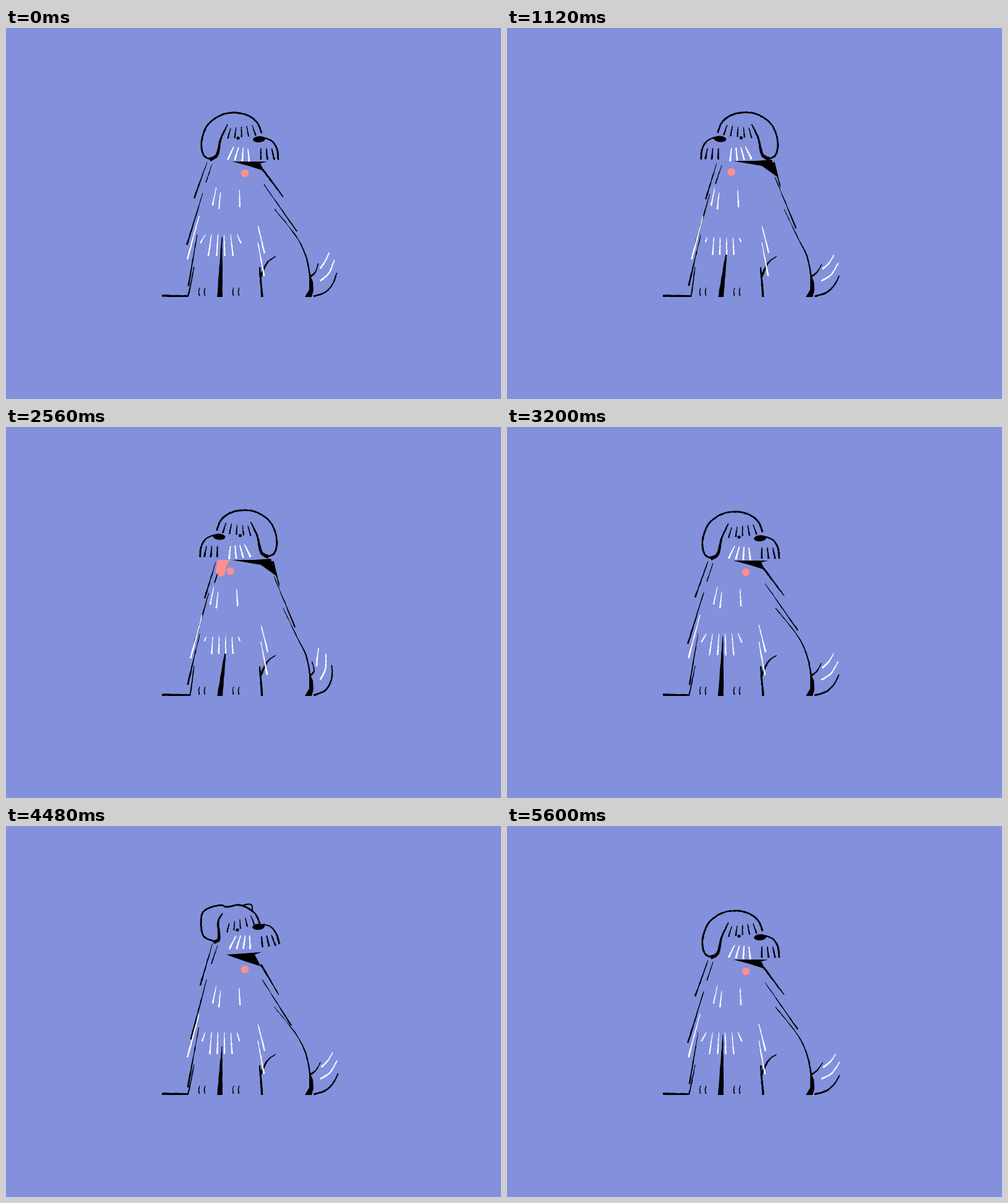
An HTML page with a canvas for the animation above (5680 ms loop, 800 by 600 pixels).

```html
<!DOCTYPE html>
<html>
<head>
<meta charset="utf-8">
<style>
  html, body { margin: 0; height: 100%; overflow: hidden; background: #8390dc; }
  canvas { display: block; }
</style>
</head>
<body>
<canvas width="800" height="600"></canvas>
<script>
const ctx = document.querySelector('canvas').getContext('2d');
const BG = '#8390dc', INK = '#000', WHITE = '#fff', PINK = '#ff8f8b';
const LOOP = 5680, STEP = 80, GROUND = 435;

// A row of straight hairs as x1,y1,x2,y2: evenly spaced, tips fanning out.
const row = (n, x, step, y, rise, len, lean, fan) =>
  Array.from({ length: n }, (_, i) =>
    [x + step * i, y + rise * i, x + step * i + lean + fan * i, y + rise * i + len]).flat();

// Head key points; looking left is the right-facing head flipped.
const heads = {
  right: {
    skull: [329,212, 319,205, 316,184, 325,158, 345,142, 367,137, 390,141, 406,153, 413,170],
    earL: [329,213, 341,205, 347,180, 358,156],
    muzzle: [416,177, 430,183, 438,196, 440,213],
    eye: [375,178], nose: [409,180],
    bangs: row(5, 363, 8.7, 162, -1.2, 17, -5, 2.7),
    chin: row(3, 412, 8.7, 195, 0, 18, 0, 2),
    beardL: row(4, 368, 7.7, 192, 1, 21, -10, 4)
  },
  front: {
    skull: [322,207, 309,200, 311,183, 331,158, 370,143, 410,154, 432,174, 438,196, 428,207],
    earL: [322,207, 333,200, 337,180, 342,166],
    earR: [428,207, 412,201, 408,183, 403,166],
    muzzle: [385,184, 399,190, 410,199, 423,210],
    eye: [346,182], eye2: [393,182], nose: [368.5,184.5],
    bangs: row(5, 350, 12, 164, 0, 14, -2, 3),
    chin: row(3, 362, 12, 206, 0, 25, 3, 4.5),
    beardL: row(4, 339, 4, 197, 3, 25, -3, 1.5),
    beardR: row(3, 400, -4, 199, 3, 15, 17, 0)
  },
  alert: {
    skull: [334,186, 318,176, 316,145, 327,133, 347,128, 357,131, 379,128, 402,141, 411,161],
    earL: [335,188, 344,182, 343,155, 350,141],
    flap: [381,129, 390,126.5, 397,128, 398,137],
    muzzle: [415,159, 428,163, 437,175, 442,191],
    eye: [374,168], nose: [408,163],
    bangs: row(5, 361, 8.6, 157, -3, 15, -4, 2.5),
    chin: row(3, 413, 8, 178, -1, 18, 2, 2.5),
    beardL: row(4, 372, 7.3, 177, 0, 22, -11, 4)
  }
};

// Shadow under the head, tag, shoulders, and how far the side tufts stick out.
const necks = {
  right: { mouth: [366,216, 422,216, 411,219, 417,231, 392,223], tag: [386,235],
    sides: [325,217, 415,229], flare: [13] },
  front: { mouth: [371,234, 400,232, 416,220, 428,236, 400,235], tag: [369,237],
    sides: [335,197, 424,227], flare: [9] },
  left: { mouth: [365,215, 400,215, 428,213, 437,241, 412,223], tag: [362.5,233],
    sides: [339,219, 431,217], flare: [5] },
  alert: { mouth: [356,208, 413,204, 402,208, 412,227, 384,218], tag: [386,232],
    sides: [334,190, 412,224], flare: [9] }
};

// Blends shared parts; a part known to one side only shows while that side is nearer.
function mix(a, b, k) {
  const out = {};
  for (const key in { ...a, ...b })
    out[key] = a[key] && b[key] ? a[key].map((v, i) => v + (b[key][i] - v) * k) : (k <= .5 ? a : b)[key];
  return out;
}

// Eases a value through steps of [from, to, target].
function track(t, v, ...steps) {
  for (const [from, to, target] of steps) {
    const k = Math.max(0, Math.min(1, (t - from) / (to - from)));
    v += (target - v) * k * k * (3 - 2 * k);
  }
  return v;
}

let seed = 0, phase = 0;
function rough() {
  const n = Math.sin(++seed * 12.9898 + phase * 78.233) * 43758.5453;
  return n - Math.floor(n) - .5;
}

function fill(points, color) {
  ctx.fillStyle = color;
  ctx.beginPath();
  for (let i = 0; i < points.length; i += 2) ctx.lineTo(points[i], points[i + 1]);
  ctx.fill();
}

function oval([x, y], rx, ry, color, angle = 0) {
  ctx.fillStyle = color;
  ctx.beginPath();
  ctx.ellipse(x, y, rx, ry, angle, 0, 7);
  ctx.fill();
}

// Tapered, slightly ragged stroke along a smooth curve through the points.
function brush(p, w0, w1, color = INK) {
  const n = p.length / 2 - 1, count = n > 1 ? n * 10 : 14, sideA = [], sideB = [];
  const pick = (i, c) => p[2 * Math.max(0, Math.min(n, i)) + c];
  const curve = (s, c) => {
    const i = Math.min(n - 1, Math.floor(s * n)), u = s * n - i;
    const [a, b, d, e] = [-1, 0, 1, 2].map(o => pick(i + o, c));
    return n === 1 ? b + (d - b) * u :
      b + .5 * u * (d - a + u * (2 * a - 5 * b + 4 * d - e + u * (3 * (b - d) + e - a)));
  };
  for (let i = 0; i <= count; i++) {
    const s = i / count, s0 = Math.max(0, s - .01), s1 = Math.min(1, s + .01);
    const x = curve(s, 0), y = curve(s, 1);
    const dx = curve(s1, 0) - curve(s0, 0), dy = curve(s1, 1) - curve(s0, 1), len = Math.hypot(dx, dy) || 1;
    const half = (w0 + (w1 - w0) * s) / 2, a = half + rough() * .7, b = half + rough() * .7;
    sideA.push(x - dy / len * a, y + dx / len * a);
    sideB.unshift(x + dy / len * b, y - dx / len * b);
  }
  fill([...sideA, ...sideB], color);
}

function hairs(list, w0, w1, color = INK) {
  for (let i = 0; list && i < list.length; i += 4)
    brush(list.slice(i, i + 4).map(v => v + rough() * .6), w0, w1, color);
}

// Bends the tail round its base; points further out swing more.
function drawTail(angle) {
  const bend = points => {
    const out = [];
    for (let i = 0; i < points.length; i += 2) {
      const x = points[i] - 494, y = points[i + 1] - 418, r = Math.hypot(x, y);
      const a = Math.atan2(y, x) - angle * Math.max(0, Math.min(1, (r - 16) / 25));
      out.push(494 + r * Math.cos(a), 418 + r * Math.sin(a));
    }
    return out;
  };
  brush(bend([492,402, 501,395, 509,382]), 3, 1.2);
  brush(bend([497,434, 516,428, 529,416, 537,401]), 3, 1.8);
  brush(bend([510,390, 521,380, 529,367]), 2.8, 1.6, WHITE);
  brush(bend([508,409, 524,399, 536,380]), 2.8, 1.6, WHITE);
}

function drawBody({ sides: [lx, ly, rx, ry], flare: [flare] }, side, perk) {
  for (const [from, to, out] of [[0, .35, 1], [.3, .8, 1.1], [.7, 1.2, .2]]) {
    const x = u => lx + (302 - lx) * u, y = u => ly + (384 - ly) * u;
    brush([x(from), y(from), x(to) - flare * out, y(to)], 1, 2.6);
  }
  brush([lx + 8, ly + 3, lx - 2, ly + 33], 1, 1.5);
  brush([rx, ry, 448 - 6 * side - 7 * perk, 273 - 16 * side], 3.2, 1.5);
  brush([rx + 2, ry + 24, 470 - 3 * side - 9 * perk, 329 - 5 * side - 6 * perk], 1, 2);
  brush([434 + 14 * side, 293, 469, 337, 485, 370, 491.5, 402], 1, 2.6);
  fill([490,397, 496,410, 497,424, 494,435, 483,435, 490,423], INK);

  brush([252,433, 290 + 3 * side,433.5, 295 + 3 * side,430, 304,386], 3.8, 1.2);
  brush([349 + 7 * side, 338 + 14 * side + 18 * perk, 345.5, 436], 1, 9);
  brush([410,387, 414,436], 2.5, 3.5);
  brush([436,369, 422,380, 411,403], 1, 4);
  for (const x of [313, 322, 368, 377]) brush([x, 420, x - 1.5, 426, x - .5, 433], 1.2, 1.8);

  // Chest hairs, then the fringe with short ends, then the long side hairs.
  hairs([340,258,334,287, 347,266,344,293, 377,262,378,290].map((v, i) => i % 2 ? v : v - 4 * side), 1.2, 2.4, WHITE);
  for (let i = 0; i < 6; i++) {
    const x = 322 + 10.3 * i + 2 * side, fan = 2.8 - 1.6 * side - perk;
    hairs([x, 334 + 5 * side, x + fan * (i - 2.8), 334 + (i % 5 ? 35 : 14) - 2 * side], 1.2, 2.4, WHITE);
  }
  hairs([312,304,293,374, 407,320,418,364, 407,347,417,401].map((v, i) => i % 2 ? v : v + 5 * side), 1.2, 2.6, WHITE);
}

function drawHead(head, closed) {
  brush(head.skull, 2.8, 2.8);
  if (head.earL) brush(head.earL, head.earR ? 3 : 6.5, 1.5);
  if (head.earR) brush(head.earR, 3, 1.5);
  if (head.flap) brush(head.flap, 2.2, 2);
  hairs(head.bangs, 1.2, 2.4);
  for (const eye of [head.eye, head.eye2])
    if (eye) oval(eye, closed ? 3.5 : 2.6, closed ? 1 : 2.6, INK);
  oval(head.nose, 10, 5, INK, -.08);
  brush(head.muzzle, 2.2, 3);
  hairs(head.chin, 1.6, 3);
  hairs(head.beardL, 1.6, 3, WHITE);
  hairs(head.beardR, 1.6, 3, WHITE);
}

function draw() {
  const t = Math.floor(performance.now() % LOOP / STEP) * STEP;
  const turn = track(t, 1, [400, 720, -1], [2800, 3120, 1]);
  const perk = track(t, 0, [4000, 4240, 1], [5200, 5440, 0]);
  const lift = track(t, 0, [560, 720, -.5], [1280, 1360, -2.5], [2800, 3120, 0], [3840, 3920, -2.5],
    [3920, 4080, 0], [4080, 4320, -3], [4320, 4480, 0]);
  const wag = track(t, .15, [960, 1280, 1], [2720, 3040, .15]);
  const rest = track(t, .15, [600, 1280, 0], [2800, 3200, -.1], [5600, 5680, .15]);
  const closed = [560, 2960, 3900].some(blink => Math.abs(t - blink) < 80);
  const neck = mix(mix(necks.front, turn < 0 ? necks.left : necks.right, Math.abs(turn)), necks.alert, perk);
  const head = mix(mix(heads.front, heads.right, Math.abs(turn)), heads.alert, perk);

  seed = 0;
  phase = t / STEP % 3;
  ctx.fillStyle = BG;
  ctx.fillRect(0, 0, 800, 600);
  ctx.save();
  ctx.beginPath();
  ctx.rect(0, 0, 800, GROUND);
  ctx.clip();
  drawTail(.42 * (rest + wag * Math.cos(t / 640 * 2 * Math.PI)));
  drawBody(neck, (1 - turn) / 2, perk);
  if (t >= 1360 && turn < -.5) fill([342,215, 362,215, 356,225, 353,240, 346,242, 339,235], PINK);
  oval(neck.tag, 6.2, 6.2, PINK);
  fill(neck.mouth, INK);
  if (perk === 1) phase = 0;
  ctx.translate(turn < 0 ? 753.5 : 0, lift);
  ctx.scale(turn < 0 ? -1 : 1, 1);
  drawHead(head, closed);
  ctx.restore();
  requestAnimationFrame(draw);
}
draw();
</script>
</body>
</html>
```
